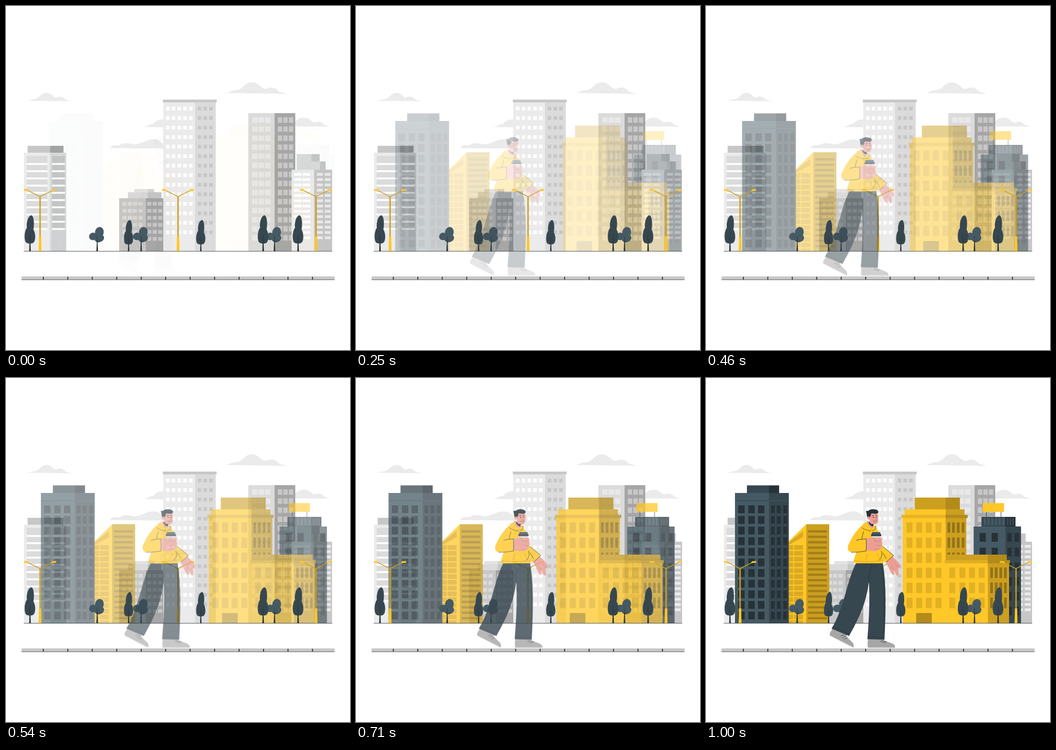
An HTML page with a canvas for the animation above (1040 ms loop, 748x748 px).

```html
<!DOCTYPE html>
<html lang="en">
<head>
<meta charset="utf-8">
<title>City walk</title>
<style>
html, body { margin: 0; width: 100%; height: 100%; overflow: hidden; background: #fff; }
canvas { display: block; width: 748px; height: 748px; }
</style>
</head>
<body>
<canvas id="stage" width="748" height="748"></canvas>
<script>
const SIZE = 748, LOOP = 1040, FPS = 24;
const YELLOW = '#ffc727', GOLD = '#cc9f1f', OCHRE = '#b38b1b', PANE = '#e2b023', BRONZE = '#94731a';
const INK = '#263238', SLATE = '#37474f', STEEL = '#455a64';
const SKIN = '#eb9f94', SKIN_LINE = '#c9736a';
const G1 = '#ebebeb', G2 = '#dbdbdb', G3 = '#c7c7c7', G4 = '#a6a6a6';

let ctx;

function layer(draw) {
  const c = document.createElement('canvas');
  c.width = c.height = SIZE;
  ctx = c.getContext('2d');
  draw();
  return c;
}

// rectangle by its edges
function box(color, x1, y1, x2, y2) {
  ctx.fillStyle = color;
  ctx.fillRect(x1, y1, x2 - x1, y2 - y1);
}

function shape(color, d) {
  ctx.fillStyle = color;
  ctx.fill(new Path2D(d));
}

function line(color, width, d) {
  ctx.strokeStyle = color;
  ctx.lineWidth = width;
  ctx.lineCap = ctx.lineJoin = 'round';
  ctx.stroke(new Path2D(d));
}

function oval(color, x, y, rx, ry, turn = 0) {
  ctx.fillStyle = color;
  ctx.beginPath();
  ctx.ellipse(x, y, rx, ry, turn, 0, 7);
  ctx.fill();
}

function grid(color, xs, w, y, rows, step, h) {
  for (let i = 0; i < rows; i++)
    for (const x of xs) box(color, x, y + i * step, x + w, y + i * step + h);
}

// two-faced block: left edge, corner, right edge
function block(front, side, x1, xm, x2, y1, y2) {
  box(front, x1, y1, xm, y2);
  box(side, xm, y1, x2, y2);
}

function clouds() {
  shape(G1, 'M43 206C52 206 54 203 60 203C73 202 75 189 88 189C101 189 102 200 109 199C118 194 126 199 129 203C133 206 138 205 143 207Z');
  shape(G1, 'M473 189C485 190 488 183 500 183C517 182 517 166 534 166C552 166 554 182 566 180C578 174 588 179 592 185C598 189 604 188 609 191Z');
  shape(G1, 'M296 263C307 263 310 256 319 257C328 246 338 246 350 246V264Z');
  shape(G1, 'M226 309C231 302 238 302 246 303C258 295 270 299 280 301C298 299 305 290 320 290C336 290 338 299 348 304V310Z');
  shape(G1, 'M615 262L628 252C637 243 643 243 650 243C663 244 664 255 673 253C682 249 689 254 692 258C696 260 700 260 704 262Z');
}

function greyTowers() {
  block(G3, G4, 47, 96, 125, 304, 319);
  block(G1, G2, 39, 96, 131, 319, 533);
  box(G2, 45, 326, 90, 487);
  box(G3, 100, 326, 128, 487);
  box('#d3d4d5', 100, 488, 130, 533);
  grid('#fff', [45], 45, 341.5, 10, 15.7, 4);
  grid('#fff', [100], 28, 341.5, 10, 15.7, 4);

  block('#e3e3e3', '#d5d5d5', 279, 308, 322, 398, 406);
  block(G2, G3, 265, 308, 338, 405, 418);
  block(G3, G4, 246, 304, 344, 418, 533);
  grid(G2, [253, 265, 276, 288], 9, 426, 6, 15.3, 8);
  grid(G3, [307, 319, 331], 9, 426, 6, 15.3, 8);

  block(G1, G2, 342, 411, 456, 209, 533);
  box(G3, 341, 203.5, 458, 209.5);
  grid('#fff', [348, 360.5, 373, 385.5, 398], 7.5, 219, 14, 20.7, 8);
  grid(G3, [417, 429.5, 442], 7.5, 219, 14, 20.7, 8);

  block(G2, G4, 527, 584, 629, 233, 533);
  grid('#e8e8e8', [535, 549, 563], 12, 242, 14, 19.7, 12);
  grid(G3, [591, 603, 615], 9.5, 242, 14, 19.7, 12);

  block(G2, G3, 632, 664, 682, 322, 356);
  block(G2, G3, 664, 683, 695, 338, 356);
  block(G1, G3, 621, 670, 709, 356, 533);
  grid('#fff', [626, 645], 17, 363, 13, 11.5, 6);
  grid(G1, [676, 693], 13, 363, 13, 11.5, 6);
}

function sidewalk() {
  box(G3, 34, 588, 714.5, 595.5);
  line('#555', 1, 'M34 595.3H714');
  for (let i = 0; i < 12; i++) oval(INK, 81.2 + i * 53.2, 591.8, 1.1, 3.4);
}

function darkTower() {
  block(SLATE, INK, 89, 137, 159, 233.5, 250);
  block(STEEL, SLATE, 63, 137, 180, 250, 533);
  box('#3c4f59', 63, 265.5, 180, 268);
  grid(INK, [70, 92, 113], 14, 277, 11, 23.1, 17);
  grid(INK, [141, 154, 168], 8.5, 277, 11, 23.1, 17);
}

function slantedTower() {
  shape(YELLOW, 'M180 355L218 318V533H180Z');
  box(GOLD, 218, 318, 268, 533);
  shape('#dba922', 'M180 357L211 333V533H180Z');
  shape(YELLOW, 'M180 363L211 346V361H180Z');
  grid(YELLOW, [180], 31, 361, 14, 12.6, 2.5);
  box(YELLOW, 189.5, 360, 191.5, 533);
  grid('#a37f19', [222], 41, 331, 17, 11.8, 5);
}

function rearTower() {
  line(INK, 1, 'M609.5 290V302M641.5 290V302');
  box(YELLOW, 602, 272, 648, 291);
  block(SLATE, INK, 599, 651, 673, 302, 323);
  grid(STEEL, [604, 612, 620, 628, 636, 644], 5, 305, 1, 1, 15);
  grid(SLATE, [654, 660, 666], 4, 305, 1, 1, 15);
  block(STEEL, SLATE, 582, 651, 685, 323, 533);
  grid(INK, [595, 621], 13.5, 337, 2, 32, 19);
  grid(INK, [655, 671], 10, 337, 6, 32, 19);
}

function yellowBlocks() {
  block(GOLD, OCHRE, 454, 521, 552, 260, 286);
  block(YELLOW, GOLD, 432, 521, 562, 285.5, 298);
  block(YELLOW, GOLD, 428, 521, 566, 304, 533);
  block('#e6b323', OCHRE, 425, 521, 569, 297.5, 304.5);
  const rows = [314, 6, 32.8, 22.5];
  grid(PANE, [436, 457, 478, 499], 13, ...rows);
  grid(BRONZE, [525, 535, 545.5, 556], 6, ...rows);
  box(OCHRE, 457, 511, 491, 533);

  block(GOLD, OCHRE, 525, 613, 654, 384, 396);
  block(YELLOW, GOLD, 521, 613, 659, 403, 533);
  block('#e0ae22', OCHRE, 519, 613, 661, 396, 403);
  grid(PANE, [529, 551, 572, 593], 13, 412, 3, 32.8, 23);
  grid(BRONZE, [618, 628, 638, 648], 6, 412, 3, 32.8, 23);
}

function city() {
  darkTower();
  slantedTower();
  rearTower();
  yellowBlocks();
}

function lamp(x) {
  ctx.save();
  ctx.translate(x, 0);
  line(GOLD, 1.6, 'M-26 401.5L0 414.5L26 401.5');
  box(GOLD, -1.4, 414, 1.6, 503);
  shape(YELLOW, 'M-2.3 501H2.6L3.2 533H-3Z');
  shape(YELLOW, 'M-35 398L-26 398.5L-24 402.5L-35 401.5ZM35 398L26 398.5L24 402.5L35 401.5Z');
  ctx.restore();
}

function cypress(x, k) {
  ctx.save();
  ctx.translate(x, 533);
  ctx.scale(k, k);
  shape(INK, 'M-1.6 0L-0.6 -30H0.6L2 0Z');
  shape(SLATE, 'M3 -78C-5 -76 -8 -60 -6.5 -51C-13 -43 -13 -20 -7 -18C-3 -16 4 -16 7 -18C13 -21 13 -39 7.5 -47C10 -57 9 -77 3 -78Z');
  line(INK, 0.8, 'M0 -18V-36M0 -20L4 -27M0 -24L-3 -29');
  ctx.restore();
}

function bushy(x) {
  ctx.save();
  ctx.translate(x, 533);
  oval(STEEL, 5, -41, 9.5, 11.5, 0.2);
  oval(STEEL, -9, -32, 8.5, 8, -0.6);
  oval(STEEL, 5, -28, 10.5, 8.5, -0.3);
  shape(INK, 'M-1.5 0L-0.2 -24H1L2 0Z');
  line(INK, 0.9, 'M0.4 -20V-32M0.4 -18L6 -24M0.4 -19L-6 -25');
  ctx.restore();
}

function street() {
  line(INK, 0.9, 'M39 533.3H709');
  [198, 293.5, 583.5].forEach(bushy);
  [52, 559, 635].forEach(x => cypress(x, 1));
  [266.5, 423.5].forEach(x => cypress(x, 0.87));
  [74, 374, 674].forEach(lamp);
}

function legs() {
  // shoes
  shape(G4, 'M276 544L306 557C304 566 317 570 321 579V586L270 560C267 556 272 551 276 544Z');
  line(G2, 1.2, 'M270 560.5L320 586.5');
  line(INK, 0.8, 'M293 561L300 558M297 565L303 561M301 568L307 565');
  shape(G4, 'M353 566H383C387 575 408 574 411 583V587H352C351 580 351 573 353 566Z');
  line(G2, 1.2, 'M352.5 586H411');
  line(INK, 0.8, 'M379 573L386 570M383 575L390 572M387 576L393 573');
  // trousers
  shape(SLATE, 'M327 401H384C390 430 393 480 388 569L351 568C354 530 357 480 354 443C350 480 338 514 311 561L273 545C302 497 306 440 327 401Z');
  line(INK, 0.9, 'M354 443C355 429 355 420 360 410M359 403C358 410 363 412 370 410M386 556C388 510 388 450 382 412');
  line(INK, 0.7, 'M276 541L312 557M352 563L388 564');
}

function torso() {
  // far arm and hand
  shape(SKIN, 'M390 398L405 387C410 394 420 400 423 409L422 415L418 412L419 428L415 430L408 417L410 427L406 428C400 420 396 408 390 398Z');
  line(SKIN_LINE, 0.8, 'M408 417L403 407M418 412L411 403');
  shape(YELLOW, 'M370 338C378 352 381 360 383 365L408 386L391 401L372 388Z');
  line(INK, 0.9, 'M384 366L408 386L392 400M383 378L392 393');
  // body
  shape(YELLOW, 'M342 319C331 326 323 338 316 350L309 364C307 373 310 378 317 379L327 378L321 397C320 402 324 404 330 403H382C388 402 388 396 385 389L383 362C380 346 376 334 371 327C365 318 350 314 342 319Z');
  line(INK, 0.9, 'M316 379C328 379 338 378 348 376M327 353C334 351 341 350 349 350M343 334C341 340 339 345 339 350M381 376C384 384 382 390 377 396');
  line(GOLD, 0.9, 'M323 397C340 400 365 400 385 396M351 383L347 396M372 382L377 394');
}

function head() {
  shape(SKIN, 'M350 311L363 314L364 326L357 330L348 320Z');
  shape(SKIN, 'M355 296C361 292 370 292 373 295C375 303 376 313 371 317C365 320 359 318 356 311Z');
  oval(SKIN, 354, 304, 3.2, 3.8);
  shape(INK, 'M355 312C357 317 361 319 364 317V321C362 325 356 320 354 315Z');
  shape(INK, 'M348 290C349 288 352 289 353 289C357 284 370 284 374 289C377 294 371 297 360 294C358 298 358 301 356 303C354 299 352 301 352 304C349 299 350 295 348 290Z');
  oval(INK, 364, 303, 0.9, 1.4);
  oval(INK, 371, 302.5, 0.8, 1.3);
  line(INK, 0.9, 'M361 299.5L365 298.5M369 298.5L372 298.8');
  line(SKIN_LINE, 0.9, 'M368 302L369.5 308L367 308.5');
  line(INK, 0.8, 'M364 311C366 313 369 312 371 310');
  // hood
  shape(YELLOW, 'M339 328C338 317 346 312 351 315C353 322 357 326 362 328C365 325 364 322 367 320C372 323 372 329 365 332C355 335 343 333 339 328Z');
  line(INK, 0.8, 'M339 325C343 330 349 329 355 333L359 330M368 322C371 326 368 331 362 332');
  line(GOLD, 0.9, 'M358 332L359 336');
}

function coffee() {
  box('#dedede', 361, 343, 379.5, 352);
  shape(STEEL, 'M361.5 335H378.5L380 340H360Z');
  shape(SLATE, 'M359 339.5H381V344H359Z');
  shape(SKIN, 'M348 350C354 347 360 348 364 347H379C384 347 384 353 381 355C385 358 384 363 381 364C384 368 382 372 377 372C375 377 363 378 358 375L348 376Z');
  line(SKIN_LINE, 0.8, 'M381 355H368M381 364H368M377 372H366M362 348C368 350 370 353 366 355');
  line(INK, 0.9, 'M348 350C349 358 349 368 348 376');
}

function walker() {
  legs();
  torso();
  head();
  coffee();
}

const back = layer(() => { clouds(); greyTowers(); sidewalk(); });
const town = layer(city);
const front = layer(street);
const man = layer(walker);

// [step, progress] pairs
const TOWN_KEYS = [[0, .02], [6, .265], [9, .405], [13, .577], [17, .745], [20, .873], [24, 1]];
const MAN_KEYS = [[0, .02], [6, .275], [9, .415], [13, .612], [17, .8], [20, .955], [22, 1], [24, 1]];

function progress(keys, n) {
  let i = 1;
  while (i < keys.length - 1 && n > keys[i][0]) i++;
  const [n0, p0] = keys[i - 1], [n1, p1] = keys[i];
  return p0 + (p1 - p0) * (n - n0) / (n1 - n0);
}

const stage = document.getElementById('stage').getContext('2d');

function slide(img, p, from) {
  stage.globalAlpha = p;
  stage.drawImage(img, from * (1 - p), 0);
  stage.globalAlpha = 1;
}

const start = performance.now();

function render() {
  const t = Math.max(0, performance.now() - start) % LOOP;
  const n = Math.min(24, Math.floor((t + 5) * FPS / 1000));
  stage.fillStyle = '#fff';
  stage.fillRect(0, 0, SIZE, SIZE);
  stage.drawImage(back, 0, 0);
  slide(town, progress(TOWN_KEYS, n), 30.3);
  stage.drawImage(front, 0, 0);
  slide(man, progress(MAN_KEYS, n), -29.5);
  requestAnimationFrame(render);
}
render();
</script>
</body>
</html>
```
